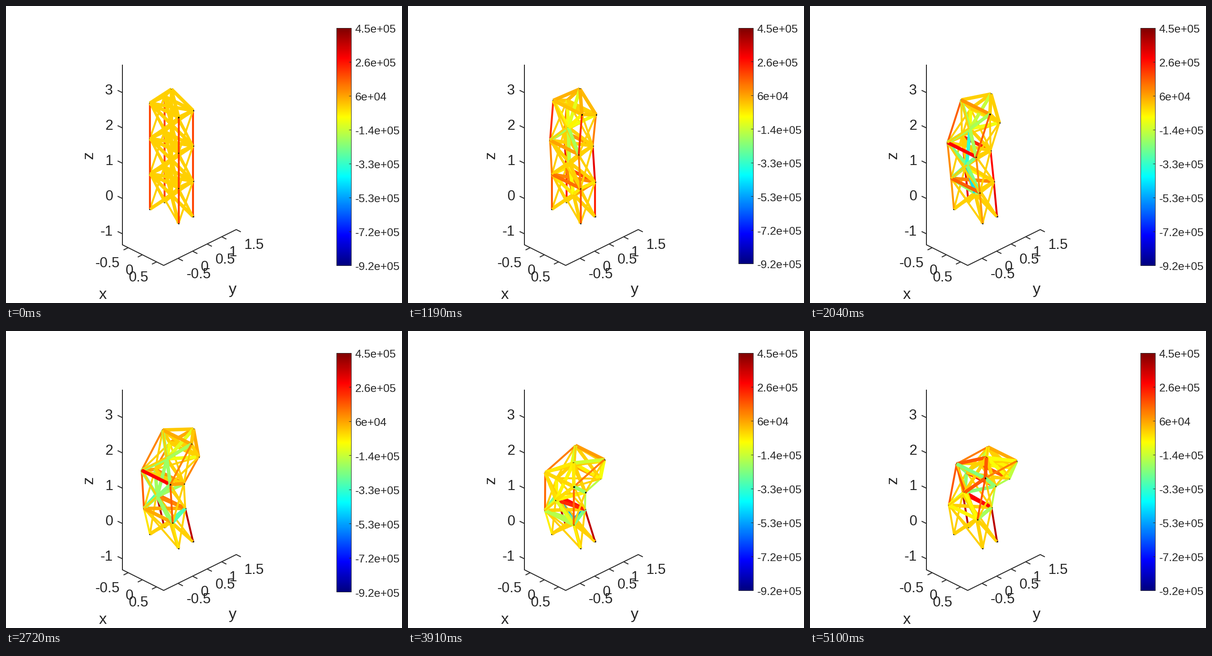
Write a matplotlib script that moves like this. It is 864 px wide and 648 px high and loops after 5270 ms.

```python
import numpy as np
import matplotlib.pyplot as plt
from matplotlib.animation import FuncAnimation
from matplotlib.collections import LineCollection

W, H, DPI = 864, 648, 100
FRAMES, STEP = 31, 170
PX = 72 / DPI
INK = (0.15, 0.15, 0.15)
LOW, HIGH = -9.2, 4.5            # colour limits, in 1e5
XDIR = np.array([62.5, 31.0])    # one unit along x on screen
KEYS = np.array([0, 7, 12, 16, 20, 26, 30])

# Screen paths of the joints after the rest pose: near side, far side, cores
PATHS = {
    "A1": [(314, 367), (308, 376), (301, 387), (300, 389), (299, 391), (303, 380)],
    "A2": [(310, 293), (300, 298), (296, 304), (296, 307), (306, 306), (320, 290)],
    "A3": [(317, 206), (330, 205), (342, 216), (357, 238), (374, 256), (388, 253)],
    "C1": [(408, 384), (401, 383), (391, 387), (389, 387), (386, 390), (396, 385)],
    "C2": [(403, 305), (394, 315), (388, 333), (386, 342), (391, 356), (404, 339)],
    "C3": [(410, 237), (413, 255), (420, 275), (414, 309), (428, 327), (434, 322)],
}
CORES = {
    "M1": [(361, 411), (360, 408), (358, 415), (359, 414), (361, 410), (364, 410)],
    "M2": [(352, 341), (342, 346), (330, 361), (327, 364), (323, 369), (338, 352)],
    "M3": [(350, 265), (349, 268), (351, 279), (354, 280), (371, 292), (385, 276)],
    "M4": [(375, 181), (395, 192), (409, 214), (419, 268), (430, 290), (437, 298)],
}

# Member forces in 1e5: columns, level frames, inner webs
COLUMNS = {
    "vA1": [1.6, 0.7, -0.3, -0.3, -0.6, 0],
    "vA2": [1.0, 0.9, 1.5, 1.6, 1.2, 1.6],
    "vA3": [2.1, 1.5, 1.0, 1.1, 1.1, 1.1],
    "vC1": [2.4, 3.1, 3.7, 3.8, 3.5, 3.7],
    "vC2": [3.1, 2.7, 0, -0.3, -3.0, -1.5],
    "vC3": [1.1, 0, 1.0, -2.3, -0.8, -1.7],
}
LEVELS = {
    "hA1": [1.3, 1.5, 0.5, -1.3, -2.0, -0.5],
    "hA2": [0.6, 2.8, 2.8, -2.2, 2.0, -2.3],
    "hA3": [0.2, 0.8, 0.5, 0.2, 1.2, 0.5],
    "hC1": [1.8, -0.5, 1.2, 2.1, 3.2, 2.8],
    "hC2": [0.8, 2.3, 0.8, 3.0, 0.8, 2.8],
    "hC3": [0, -0.4, 0, 1.2, 0, 1.5],
    "hB1": [-0.3, 0, -3.0, -2.8, -2.0, -1.8],
    "hB2": [0, 0, 0.6, -2.0, -2.0, -2.2],
    "hB3": [0.1, 0, 0, -0.8, -0.7, -1.5],
    "x1": [1.0, 1.0, 0.5, 0, 0, 0],
}
WEBS = {
    "uA1": [-0.3, -2.0, -0.5, -1.3, -2.0, -0.5],
    "uC1": [1.0, 0, -3.0, -3.0, -8.0, -2.5],
    "lA2": [0, -2.3, -2.0, -1.0, -1.0, -0.6],
    "lC2": [0, 0, 1.0, 1.5, 3.0, 2.8],
    "uA2": [0, -2.4, -2.2, 1.6, -2.0, 1.6],
    "uC2": [0, 0, -1.9, -2.0, 1.0, -2.2],
    "lA3": [-1.8, -1.8, -2.0, 1.3, -2.0, 1.6],
    "uA3": [-0.5, -1.8, -1.8, -0.5, -2.0, -0.7],
    "uC3": [-0.8, -0.8, -0.8, -0.4, -0.5, -0.7],
    "lA4": [0.4, 0, 0.1, 0, 0, 0],
    "lC4": [0.3, 0, 0.5, 0, 0, -0.5],
    "m1": [-0.7, -4.5, -2.0, -1.0, -4.0, -1.0],
    "m2": [-1.5, -3.5, -2.0, -1.0, 0, 0],
    "m3": [-1.0, -1.4, -1.0, -0.5, -0.5, -0.5],
}


def jet(v):
    f = (np.asarray(v, float) - LOW) / (HIGH - LOW)
    rgb = [1.5 - np.abs(4 * f - c) for c in (3, 2, 1)]
    return np.clip(np.stack(rgb, axis=-1), 0, 1)


def smooth(values, f):
    """Cubic Hermite curve through the key poses, starting at rest."""
    v = np.asarray(values, float)
    m = np.gradient(v, KEYS, axis=0)
    m[0] = 0
    i = min(np.searchsorted(KEYS, f, side="right") - 1, len(KEYS) - 2)
    h = KEYS[i + 1] - KEYS[i]
    t = (f - KEYS[i]) / h
    return ((1 + 2 * t) * (1 - t) ** 2 * v[i] + t * (1 - t) ** 2 * h * m[i]
            + t * t * (3 - 2 * t) * v[i + 1] + t * t * (t - 1) * h * m[i + 1])


def rest(name):
    x, y, lift = {"A": (314, 443, 0), "C": (408, 459, 0), "M": (361, 451, 0.5)}[name[0]]
    return x, y - 77 * (int(name[1]) - lift)


def joints(f):
    p = {n: np.array(rest(n), float) for n in ("A0", "C0")}
    for n, path in {**PATHS, **CORES}.items():
        p[n] = smooth([rest(n)] + path, f)
    for k in "0123":
        p["B" + k] = p["A" + k] + XDIR
        p["D" + k] = p["C" + k] - XDIR
    return p


def depth(name, q):
    """Closeness to the camera, from the screen place and the known x."""
    x = {"A": -0.5, "D": -0.5, "B": 0.5, "C": 0.5, "M": 0}[name[0]]
    y = (q[0] - 361 - XDIR[0] * x) / 64
    z = (451 + XDIR[1] * x - 32 * y - q[1]) / 77
    return 0.612 * (x - y) + 0.5 * z


def build():
    thin, thick = 4.2, 7.6
    side = dict(A="A", B="A", C="C", D="C")
    out = []
    for k in range(1, 4):
        lo, up = str(k - 1), str(k)
        for c in "ABCD":
            out.append((c + lo, c + up, thin, "v" + side[c] + up))
            out.append(("M" + up, c + lo, thick, "l" + side[c] + up))
            out.append(("M" + up, c + up, thick, "u" + side[c] + up))
        for a, b, key in ("ABA", "DCC", "BCB", "ADB"):
            out.append((a + up, b + up, thick, "h" + key + up))
            out.append((a + lo, b + up, thin, "d"))
            out.append((b + lo, a + up, thin, "d"))
        out.append(("A" + up, "C" + up, thick, "x" + up))
        out.append(("B" + up, "D" + up, thick, "x" + up))
        out.append(("M" + up, "M" + str(k + 1), thick, "m" + up))
    out += [("M4", c + "3", thick, "l" + side[c] + "4") for c in "ABCD"]
    return out


MEMBERS = build()
FORCES = {**COLUMNS, **LEVELS, **WEBS}


def force(key, f):
    if key not in FORCES:
        return 0.0
    first = 1.9 if key[0] == "v" else 0
    return np.interp(f, KEYS, [first] + FORCES[key])


def bar_bottom(f):
    if 4 <= f < 10:
        return 562
    return 569 if 13 <= f < 18 else 566


fig = plt.figure(figsize=(W / DPI, H / DPI), dpi=DPI, facecolor="white")
ax = fig.add_axes([0, 0, 1, 1])
ax.set_xlim(0, W)
ax.set_ylim(H, 0)
ax.axis("off")


def label(x, y, s, size, ha="center", **kw):
    return ax.text(x, y, s, fontsize=size * PX, family="Liberation Sans",
                   color=INK, ha=ha, va="baseline", **kw)


def stroke(xs, ys, width=2.0):
    return ax.plot(xs, ys, color=INK, lw=width * PX, solid_capstyle="butt")[0]


# 3D axes
stroke([254, 254, 344, 503], [128, 521, 566, 487.5])
for i in range(5):
    y = 189 + 77 * i
    stroke([254, 243.5], [y, y - 5])
    label(233.5, y + 4, str(3 - i), 31, "right")
for i, (s, x, y) in enumerate([("-0.5", 221, 570), ("0", 269.5, 586), ("0.5", 289, 601)]):
    tx, ty = 266.5 + 31 * i, 527.3 + 15.5 * i
    stroke([tx, tx - 10], [ty, ty + 5])
    label(x, y, s, 31)
for i, (s, x) in enumerate([("-0.5", 420), ("0", 433.5), ("0.5", 478), ("1", 495), ("1.5", 541)]):
    tx, ty = 376 + 31.6 * i, 551 - 15.8 * i
    stroke([tx, tx + 10], [ty, ty + 5])
    label(x, 594 - 16 * i, s, 31)
label(211, 639, "x", 34)
label(494, 628, "y", 34)
label(190, 325, "z", 34, rotation=90, rotation_mode="anchor")

# Colour bar
ramp = jet(np.linspace(HIGH, LOW, 256))[:, None, :]
bar = ax.imshow(ramp, extent=(721, 753, 566, 48), aspect="auto", interpolation="nearest")
ax.set_xlim(0, W)
ax.set_ylim(H, 0)
edge = stroke([721, 753, 753, 721, 721], [48, 48, 566, 566, 48], 1)
names = ["4.5e+05", "2.6e+05", "6e+04", "-1.4e+05", "-3.3e+05", "-5.3e+05", "-7.2e+05", "-9.2e+05"]
marks = [(stroke([748, 753], [0, 0], 1), label(762, 0, s, 24.5, "left")) for s in names]

truss = LineCollection([], capstyle="butt", zorder=5)
ax.add_collection(truss, autolim=False)


def draw(f):
    p = joints(f)
    near = {n: depth(n, q) for n, q in p.items()}
    parts = [((near[a] + near[b]) / 2, (p[a], p[b]), w, jet(force(key, f)))
             for a, b, w, key in MEMBERS]
    dot = np.array([1.8, 0])
    parts += [(near[n], (q - dot, q + dot), 3.4, np.zeros(3)) for n, q in p.items()]
    parts.sort(key=lambda part: part[0])
    truss.set_segments([s for _, s, _, _ in parts])
    truss.set_linewidths([w * PX for _, _, w, _ in parts])
    truss.set_color([c for _, _, _, c in parts])

    b = bar_bottom(f)
    bar.set_extent((721, 753, b, 48))
    ax.set_xlim(0, W)
    ax.set_ylim(H, 0)
    edge.set_ydata([48, 48, b, b, 48])
    for i, (tick, text) in enumerate(marks):
        y = 48 + (b - 48) * i / 7
        tick.set_ydata([y, y])
        text.set_y(y + 10.5)
    return [truss, bar, edge]


anim = FuncAnimation(fig, draw, frames=FRAMES, interval=STEP, repeat=True,
                     repeat_delay=0, blit=False)
plt.show()
```
